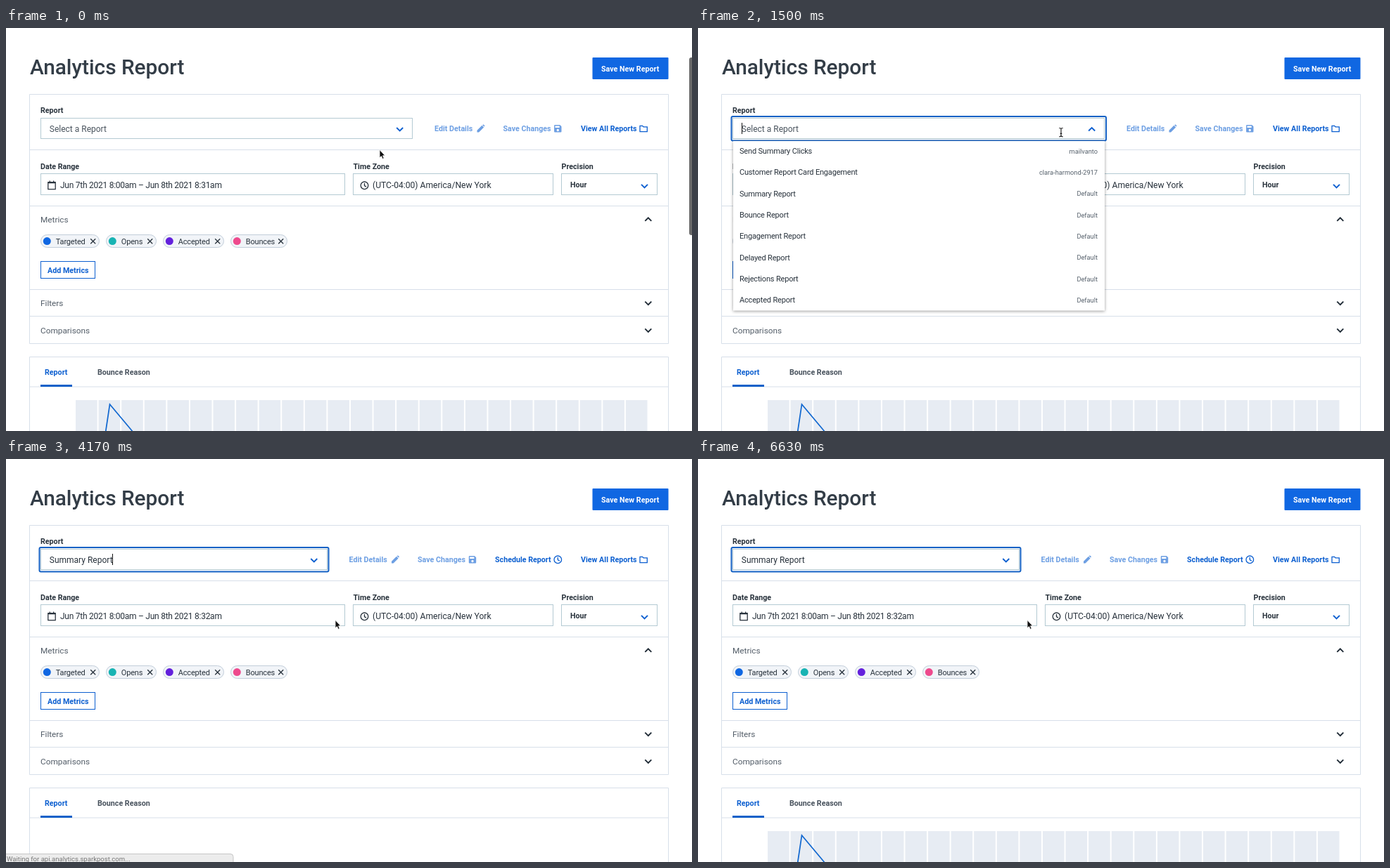
These frames come from a looping animation (975 px wide and 574 px high, 6730 ms). An HTML page:

```html
<!DOCTYPE html>
<html lang="en">
<head>
<meta charset="utf-8">
<title>Analytics Report</title>
<style>
html, body { margin: 0; width: 100%; height: 100%; overflow: hidden; background: #fff; }
svg { display: block; width: 975px; height: 574px; }
text { font: 400 12px Roboto, Arial, sans-serif; fill: #28323c; }
.title { font-size: 29.8px; font-weight: 500; fill: #333d47; }
.value { fill: #4a545e; }
.date { letter-spacing: -.26px; }
.zone { font-size: 12.1px; }
.section { font-size: 11.8px; fill: #535d68; }
.label, .link, .tab { font-size: 10.7px; font-weight: 600; }
.link { fill: #0c5fd0; }
.tab { fill: #48525d; }
.chip, .row text { font-size: 11px; letter-spacing: -.18px; }
.row .owner { font-size: 9.25px; letter-spacing: 0; fill: #55606b; text-anchor: end; }
.status { font-size: 9.55px; fill: #777; }
.line { fill: none; stroke: #d7dfe9; }
.field { fill: #fff; stroke: #b4cad3; }
.ring { fill: #fff; stroke: #1461c4; stroke-width: 2; }
.icon { fill: none; stroke: #28323c; stroke-width: 1.3; }
.blue { stroke: #0c5fd0; }
.chev { fill: none; stroke: #1f2a35; stroke-width: 1.9; }
.chev.blue { stroke: #0c5fd0; }
.off { opacity: .6; }
.caret { fill: #111; }

.step { animation: 6730ms step-end infinite; }
.ease { animation: 6730ms linear infinite; }
#before { animation-name: before; }
#after { animation-name: after; }
#closed { animation-name: closed; }
#opened { animation-name: opened; }
#menu { animation-name: menu; filter: drop-shadow(0 1px 2px #0006); }
#caretA { animation-name: caretA; }
#caretB { animation-name: caretB; }
#chart { animation-name: chart; }
#status { animation-name: status; }
#bar { animation-name: bar; }
#mouse { animation-name: move; }
#arrow { animation-name: arrow; }
#beam { animation-name: beam; }
#hand { animation-name: hand; }
.hover { fill: #edf4fc; opacity: 0; }
.r0 .hover { animation-name: bg0; } .r0 .name { animation-name: ink0; }
.r1 .hover { animation-name: bg1; } .r1 .name { animation-name: ink1; }
.r2 .hover { animation-name: bg2; } .r2 .name { animation-name: ink2; }

@keyframes before { 0% { opacity: 1 } 60.48%, 100% { opacity: 0 } }
@keyframes after { 0% { opacity: 0 } 60.48%, 100% { opacity: 1 } }
@keyframes closed { 0% { opacity: 1 } 20.36%, 100% { opacity: 0 } }
@keyframes opened { 0% { opacity: 0 } 20.36%, 100% { opacity: 1 } }
@keyframes menu { 0%, 20.36% { opacity: 0 } 22.2%, 60.48% { opacity: 1 } 61.96%, 100% { opacity: 0 } }
@keyframes caretA {
  0%, 27.79%, 42.64%, 57.5%, 100% { opacity: 0 }
  20.36%, 35.22%, 50.07% { opacity: 1 }
}
@keyframes caretB {
  0%, 67.9%, 82.76%, 97.62%, 100% { opacity: 0 }
  60.48%, 75.33%, 90.19% { opacity: 1 }
}
@keyframes chart { 0%, 87.67%, 100% { opacity: 1 } 60.48% { opacity: 0 } }
@keyframes status { 0%, 74.29%, 100% { opacity: 0 } 61.66% { opacity: 1 } }
@keyframes bar { 0%, 7.6% { opacity: 1 } 10.4%, 100% { opacity: 0 } }
@keyframes move {
  0%, 13.4% { transform: translate(531px, 174px); animation-timing-function: ease-in-out }
  18.28%, 41.16% { transform: translate(516px, 148px) }
  43.09% { transform: translate(497px, 176px); animation-timing-function: ease-out }
  49.5%, 100% { transform: translate(468px, 230px) }
}
@keyframes arrow { 0%, 60.48%, 100% { opacity: 1 } 16.05% { opacity: 0 } }
@keyframes beam { 0%, 42.05%, 100% { opacity: 0 } 16.05% { opacity: 1 } }
@keyframes hand { 0%, 60.48%, 100% { opacity: 0 } 42.05% { opacity: 1 } }
@keyframes bg0 { 0%, 42.05%, 46.36%, 100% { opacity: 0 } 44.13% { opacity: 1 } }
@keyframes bg1 { 0%, 44.13%, 49.26%, 100% { opacity: 0 } 46.36%, 47.03% { opacity: 1 } }
@keyframes bg2 { 0%, 47.03% { opacity: 0 } 49.26%, 100% { opacity: 1 } }
@keyframes ink0 { 0%, 44.13%, 100% { fill: #28323c } 42.05% { fill: #0c5fd0 } }
@keyframes ink1 { 0%, 47.03%, 100% { fill: #28323c } 44.13% { fill: #0c5fd0 } }
@keyframes ink2 { 0% { fill: #28323c } 47.03%, 100% { fill: #0c5fd0 } }
</style>
</head>
<body>
<svg viewBox="0 0 975 574">
  <defs>
    <path id="down" d="M-4.5-2.2 0 2.3 4.5-2.2"/>
    <path id="up" d="M-4.5 2.3 0-2.2 4.5 2.3"/>
    <g id="clock"><circle r="5.3"/><path d="M0-3.2V.3L2.5 1.8"/></g>
    <g id="pencil" fill="#0c5fd0">
      <path d="M-5 5v-2.6L2-4.6 4.6-2 -2.4 5zM2.7-5.2l.9-.6q.6-.2 1 .2l1 1q.5.5.1 1l-.7.8z"/>
    </g>
    <path id="disk" fill="#0c5fd0" fill-rule="evenodd"
      d="M-4.2-5.2H3L5.2-3V4.2q0 1-1 1H-4.2q-1 0-1-1V-4.2q0-1 1-1zM-3.8-3.8V-1.2H2.4V-3.8zM0 .5a1.7 1.7 0 1 0 .01 0z"/>
  </defs>

  <text class="title" x="34" y="66.3">Analytics Report</text>
  <rect x="833.5" y="42" width="108" height="31" rx="1" fill="#1067e2"/>
  <text class="label" x="846" y="61.6" style="fill:#fff">Save New Report</text>

  <path class="line" d="M33.5 94.5H941.5V449.5H33.5zM34 173.5H941M34 253.5H941M34 372.5H941M34 410.5H941"/>
  <path class="line" d="M33.5 580V468.5H941.5V580M34 511H941"/>

  <text class="label" x="49" y="121.3">Report</text>
  <text class="link" x="817" y="147.2">View All Reports</text>
  <path class="icon blue" d="M901 139.3h3.6l1.4 1.5h5.3v6.8h-10.3z"/>

  <text class="label" x="49" y="201">Date Range</text>
  <text class="label" x="493.5" y="201">Time Zone</text>
  <text class="label" x="789.5" y="201">Precision</text>
  <rect class="field" x="49.5" y="207.5" width="432" height="30"/>
  <rect class="field" x="493.5" y="207.5" width="284" height="30"/>
  <rect class="field" x="789.5" y="207.5" width="136" height="30"/>
  <path class="icon" d="M59.8 219.6h10.4v10H59.8zM62.3 217.6v2M67.7 217.6v2M59.8 220.6h10.4"/>
  <use class="icon" href="#clock" x="509.5" y="224.3"/>
  <text class="zone" x="521" y="227.6">(UTC-04:00) America/New York</text>
  <text class="label" x="802" y="227.4">Hour</text>
  <use class="chev blue" href="#down" x="907.5" y="225"/>

  <text class="section" x="49" y="277.3">Metrics</text>
  <text class="section" x="49" y="396.3">Filters</text>
  <text class="section" x="49" y="434.8">Comparisons</text>
  <use class="chev" href="#up" x="912.8" y="272.5"/>
  <use class="chev" href="#down" x="912.8" y="391.8"/>
  <use class="chev" href="#down" x="912.8" y="430.5"/>
  <g id="chips"></g>
  <rect class="icon blue" x="49.5" y="332.5" width="77" height="24" style="stroke-width:1"/>
  <text class="link" x="59" y="348.5">Add Metrics</text>

  <text class="tab" x="55" y="494" style="fill:#0c5fd0">Report</text>
  <text class="tab" x="130" y="494">Bounce Reason</text>
  <rect x="49" y="508" width="45" height="3" fill="#1161c9"/>
  <g id="chart" class="step">
    <g id="bands" fill="#e7ecf3"></g>
    <path d="M141.5 576 147.5 536 181 576" fill="none" stroke="#1168d0" stroke-width="1.7"/>
  </g>

  <g id="before" class="step">
    <g id="closed" class="step">
      <rect class="field" x="49.5" y="128.5" width="528" height="29"/>
      <use class="chev blue" href="#down" x="559.7" y="144.2"/>
    </g>
    <g id="opened" class="step">
      <rect class="ring" x="47.5" y="126" width="532.5" height="34.5" rx="2"/>
      <rect class="field" x="49.5" y="128.5" width="528" height="29"/>
      <use class="chev blue" href="#up" x="559.7" y="144.2"/>
    </g>
    <text class="value" x="61.8" y="148">Select a Report</text>
    <rect id="caretA" class="caret step" x="62" y="135" width="1" height="16"/>
    <g class="off">
      <text class="link" x="609" y="147.2">Edit Details</text>
      <use href="#pencil" x="674.5" y="143.4"/>
      <text class="link" x="706.5" y="147.2">Save Changes</text>
      <use href="#disk" x="784.3" y="143.3"/>
    </g>
    <text class="date" x="77" y="227.6">Jun 7th 2021 8:00am – Jun 8th 2021 8:31am</text>
  </g>

  <g id="after" class="step">
    <rect class="ring" x="47.5" y="126" width="411" height="34.5" rx="2"/>
    <rect class="field" x="49.5" y="128.5" width="407" height="29"/>
    <use class="chev blue" href="#down" x="437.8" y="144.2"/>
    <text x="61.8" y="148">Summary Report</text>
    <rect id="caretB" class="caret step" x="151" y="135" width="1" height="16"/>
    <g class="off">
      <text class="link" x="487.5" y="147.2">Edit Details</text>
      <use href="#pencil" x="553" y="143.4"/>
      <text class="link" x="585" y="147.2">Save Changes</text>
      <use href="#disk" x="663" y="143.3"/>
    </g>
    <text class="link" x="695" y="147.2">Schedule Report</text>
    <use class="icon blue" href="#clock" x="784.3" y="143.3"/>
    <text class="date" x="77" y="227.6">Jun 7th 2021 8:00am – Jun 8th 2021 8:32am</text>
  </g>

  <g id="menu" class="ease">
    <rect x="50" y="161" width="528" height="241.5" fill="#fff"/>
    <g id="rows"></g>
  </g>

  <g id="status" class="step">
    <path d="M-1 562.5H319q4 0 4 4V575H-1z" fill="#ececec" stroke="#c6c6c6"/>
    <text class="status" x="1" y="573">Waiting for api.analytics.sparkpost.com...</text>
  </g>

  <rect id="bar" class="ease" x="971" y="42" width="8" height="253" rx="3" fill="#6b6b6b"/>

  <g id="mouse" class="ease">
    <path id="arrow" class="step" d="M0-.5V10.8L2.5 8.6 4.2 12.4 6.2 11.5 4.5 7.8H7.8z" fill="#111" stroke="#fff" stroke-width=".8"/>
    <path id="beam" class="step" d="M-2.7-5.5Q0-5.5 0-4V5.2Q0 6.7-2.7 6.7M2.7-5.5Q0-5.5 0-4M0 5.2Q0 6.7 2.7 6.7M-1.3 2.4H1.3" fill="none" stroke="#111" stroke-width="1.1"/>
    <path id="hand" class="step" d="M-1.2.6q1-1.4 2.2 0V4L5 4.8q2.4.6 2.2 3L6.4 12.4H.6L-3.6 7.2q-.4-1.5 1-1.3L-1.2 7z" fill="#fff" stroke="#111" stroke-width="1"/>
  </g>
</svg>
<script>
const fill = (id, items, draw) => {
  document.getElementById(id).innerHTML = items.map(draw).join('');
};

fill('bands', [...Array(25).keys()], i =>
  `<rect x="${99 + i * 32.58}" y="530" width="30.6" height="50"/>`);

const chips = [
  ['Targeted', 49, 84, '#1067e2'],
  ['Opens', 142, 72, '#17b3b3'],
  ['Accepted', 223, 87, '#6320dc'],
  ['Bounces', 319, 81, '#ee4a8d']
];
fill('chips', chips, ([name, x, width, color]) => `
  <rect x="${x + .5}" y="294.5" width="${width - 1}" height="18" rx="9" fill="#f1f4f8" stroke="#c2ceda"/>
  <circle cx="${x + 9.3}" cy="303.6" r="5.5" fill="${color}"/>
  <text class="chip" x="${x + 21.8}" y="307.5">${name}</text>
  <path class="icon" d="M${x + width - 12.8} 300.3l7 7m0-7l-7 7"/>`);

const reports = [
  ['Send Summary Clicks', 'mailvanto'],
  ['Customer Report Card Engagement', 'clara-harmond-2917'],
  ...['Summary', 'Bounce', 'Engagement', 'Delayed', 'Rejections', 'Accepted']
    .map(kind => [kind + ' Report', 'Default'])
];
fill('rows', reports, ([name, owner], i) => {
  const y = 160.2 + i * 30.3;
  return `<g class="row r${i}">
    <rect class="hover ease" x="50" y="${y}" width="528" height="30.3"/>
    <text class="name step" x="59" y="${y + 18.8}">${name}</text>
    <text class="owner" x="568" y="${y + 18.6}">${owner}</text></g>`;
});
</script>
</body>
</html>
```
